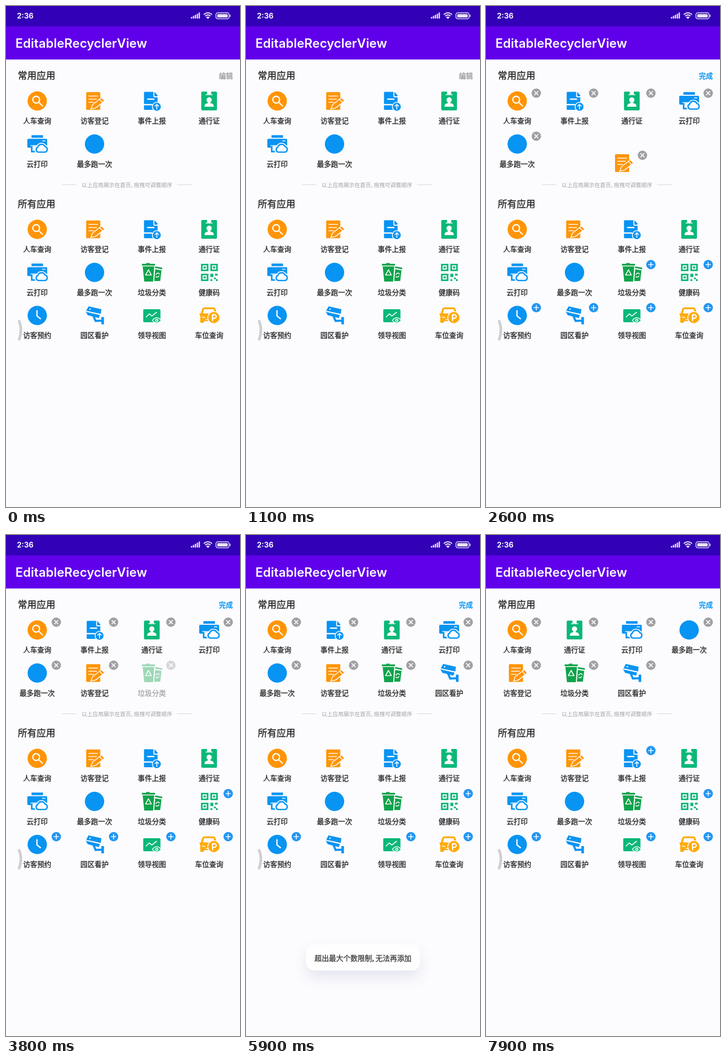
An HTML page for the animation above (8000 ms loop, 448x960 px).

```html
<!DOCTYPE html>
<html lang="zh-CN">
<head>
<meta charset="utf-8">
<title>EditableRecyclerView</title>
<style>
  :root {
    --paper: #fcfcff; --orange: #ff9505; --blue: #0894f2; --green: #0ab878;
    --leaf: #10a34c; --amber: #ffab08; --ink: #262626;
  }
  html, body { margin: 0; width: 100%; height: 100%; overflow: hidden; background: var(--paper); }
  svg { display: block; width: 448px; height: 960px; }
  text {
    font-family: "Noto Sans CJK SC", "Noto Sans CJK", "Noto Sans", sans-serif;
    font-weight: 500; fill: var(--ink); stroke: var(--ink); stroke-width: .35px;
  }
  .latin { font-family: Inter, Roboto, sans-serif; fill: #fcfcff; stroke: none; }
  .clock { font-size: 14px; font-weight: 700; }
  .bar { font-size: 24px; font-weight: 600; }
  .title { font-size: 18px; }
  .action { font-size: 13.5px; text-anchor: end; fill: #999; stroke: #999; }
  .action.done { fill: var(--blue); stroke: none; font-weight: 700; }
  .label { font-size: 13.5px; text-anchor: middle; }
  .hint { font-size: 10.5px; font-weight: 400; text-anchor: middle; fill: #a0a0a3; stroke: none; }
  .note { font-size: 13.75px; text-anchor: middle; fill: #0c0c0c; stroke: #0c0c0c; stroke-width: .45px; }
  .card { fill: #fff; filter: drop-shadow(0 13px 13px rgba(95, 95, 150, .2)); }
  .orange { fill: var(--orange); } .blue { fill: var(--blue); } .green { fill: var(--green); }
  .leaf { fill: var(--leaf); } .amber { fill: var(--amber); } .paper { fill: var(--paper); }
  .cut { fill: none; stroke: var(--paper); stroke-width: 2.4; stroke-linecap: round; stroke-linejoin: round; }
  .thin { stroke-width: 1.7; }
  .edge { stroke: var(--paper); stroke-width: 1.6; }
</style>
</head>
<body>
<svg viewBox="0 0 448 960">
  <defs>
    <clipPath id="listArea"><rect y="103" width="448" height="222"/></clipPath>

    <g id="search">
      <circle class="orange" r="18.5"/>
      <circle class="cut" cx="-2" cy="-2.5" r="6.5"/>
      <path class="cut" d="M3 2.5L10 9.5"/>
    </g>
    <g id="form">
      <rect class="orange" x="-16" y="-17" width="27" height="34" rx="1.5"/>
      <path class="cut thin" d="M-11 -9.5H6M-11 -3.5H4M-11 2.5H-2"/>
      <path class="orange edge" d="M-7 15.5L-4 7.5L13.5 -6.5L19.5 0L2 13.5Z"/>
      <path class="cut thin" d="M10.5 -2.5L15 2.5"/>
    </g>
    <g id="event">
      <path class="blue" d="M-15 -16Q-15 -17.5 -13.5 -17.5H3V-9Q3 -7 5 -7H11V17H-13.5Q-15 17 -15 15.5Z"/>
      <path class="blue" d="M5 -17.5L11 -11V-9H5Z"/>
      <path class="cut" d="M-8 -3.5H4M-15 7H-9M-8 7H0"/>
      <circle class="blue edge" cx="9.5" cy="11" r="8.5"/>
      <path class="cut thin" d="M9.5 15.5V7M6 10L9.5 6.5L13 10"/>
    </g>
    <g id="pass">
      <rect class="green" x="-15" y="-18" width="30" height="36" rx="2"/>
      <path class="paper" d="M-4 -18.5H4V-13H-4Z"/>
      <path class="cut thin" d="M-6 -12H6"/>
      <circle class="paper" cy="-2" r="5"/>
      <path class="paper" d="M-9 11Q-9 4.5 -3 4.5L-2 2H2L3 4.5Q9 4.5 9 11Z"/>
    </g>
    <g id="print">
      <rect class="blue" x="-11" y="-17" width="22" height="5"/>
      <rect class="blue" x="-19" y="-10" width="38" height="17" rx="2"/>
      <path class="blue" d="M-12 4H10V16H-12Z"/>
      <path class="cut thin" d="M-12 3H4M10 -6H15"/>
      <path class="paper" d="M-9 4H4V13H-9Z"/>
      <path id="cloud" d="M2 15.5A5 5 0 0 1 1 6A7.5 7.5 0 0 1 15 5A5.4 5.4 0 0 1 15 15.5Z" fill="var(--paper)" stroke="var(--paper)" stroke-width="6"/>
      <use href="#cloud" class="none"/>
      <path d="M2 15.5A5 5 0 0 1 1 6A7.5 7.5 0 0 1 15 5A5.4 5.4 0 0 1 15 15.5Z" fill="var(--paper)" stroke="var(--blue)" stroke-width="2.6"/>
    </g>
    <g id="run"><circle class="blue" r="18.5"/></g>
    <g id="bins">
      <path class="leaf" d="M-19 -16.5H-11V-18H-4V-16.5H6V-13H-19ZM-17.5 -11.5H4.5L2.5 17.5H-14.5Z"/>
      <path class="cut thin" d="M-6.5 -5L-1 5H-12Z"/>
      <path class="leaf" d="M6.5 -11.5L20 -9L19.5 -6L6 -8.5ZM6.5 -6L18.5 -4L16 16.5H4.5Z"/>
      <path class="cut thin" d="M8 4Q11 -1 14.5 3M13.5 7Q10.5 10.5 8 8"/>
    </g>
    <g id="code">
      <path d="M-14 -15H-3V-4H-14ZM4 -15H15V-4H4ZM-14 4H-3V15H-14Z" fill="none" stroke="var(--green)" stroke-width="3.2"/>
      <path class="green" d="M-10.5 -11.5H-6.5V-7.5H-10.5ZM7.5 -11.5H11.5V-7.5H7.5ZM-10.5 7.5H-6.5V11.5H-10.5ZM2.5 2.5H8V9H2.5ZM11 2.5H16.5V6H11ZM9 10H13V13H9ZM2.5 13H6V16.5H2.5ZM13 13H16.5V16.5H13Z"/>
    </g>
    <g id="clock">
      <circle class="blue" r="18.5"/>
      <path class="cut" d="M-.5 -9V1L6 6"/>
    </g>
    <g id="camera">
      <path class="blue" d="M-16 -9L-11.5 -17.5L13 -12L12 -3Z"/>
      <path class="blue" d="M-17 -7.5L10.5 -1L8 5L-13 -.5Z"/>
      <path class="cut thin" d="M-15 -7.5L11 -1.5"/>
      <path d="M-2 1L2 10.5L14 10" fill="none" stroke="var(--blue)" stroke-width="4"/>
      <path class="blue" d="M13 3H18V17H13Z"/>
      <circle class="paper" cx="-8.5" cy="-12" r="1.4"/>
    </g>
    <g id="chart">
      <rect class="green" x="-16.5" y="-12" width="33" height="25" rx="2"/>
      <path class="cut thin" d="M-11 3L-5 -3L0 1L9 -6"/>
      <path class="green edge" d="M1 9.5Q9.5 -1 18 9.5Q9.5 19 1 9.5Z"/>
      <circle class="paper" cx="9.5" cy="9.5" r="3"/>
      <circle class="green" cx="9.5" cy="9.5" r="1.3"/>
    </g>
    <g id="car">
      <path class="amber" d="M-19 -3L-16 -4L-13 -13Q-12 -15.5 -9 -15.5H8Q11 -15.5 12 -13L15 -4L18 -3V11H14V14H9V11H-10V14H-17V1Z"/>
      <path class="paper" d="M-12 -4L-9.5 -12H8.5L11 -4Z"/>
      <path class="cut thin" d="M-13 3L-8 4M-6 8H2"/>
      <circle class="amber edge" cx="9" cy="4" r="11.5"/>
      <path class="cut" d="M6.5 10V-1.5H10A3.5 3.5 0 0 1 10 5.5H6.5"/>
    </g>
    <g id="minus">
      <circle r="9" fill="#a0a0a2"/>
      <path class="cut thin" d="M-3.3 -3.3L3.3 3.3M3.3 -3.3L-3.3 3.3"/>
    </g>
    <g id="plus">
      <circle r="9" fill="#2196f3"/>
      <path class="cut thin" d="M-4.5 0H4.5M0 -4.5V4.5"/>
    </g>
  </defs>

  <rect class="paper" width="448" height="960"/>
  <rect y="39" width="448" height="63.5" fill="#6000ea"/>
  <rect width="448" height="39" fill="#3200b6"/>
  <text class="latin clock" x="21" y="23.5">2:36</text>
  <g fill="#e6e2f2">
    <path d="M354 21h2.5v3h-2.5zM357.7 19h2.5v5h-2.5zM361.4 17h2.5v7h-2.5zM365.1 15h2.5v9h-2.5zM368.8 12.5h2.5v11.5h-2.5z"/>
    <path d="M378.5 16.5Q386.5 9.5 394.5 16.5M381.3 19.3Q386.5 15 391.7 19.3" fill="none" stroke="#e6e2f2" stroke-width="2"/>
    <path d="M383 21.5Q386.5 18.8 390 21.5L386.5 25Z"/>
    <rect x="402" y="13" width="25" height="11.5" rx="3.5" fill="none" stroke="#e6e2f2" stroke-width="1.5"/>
    <rect x="404.5" y="15.5" width="20" height="6.5" rx="1.5"/>
    <path d="M428.5 16.5h1.5v4.5h-1.5z"/>
  </g>
  <text class="latin bar" x="18" y="80">EditableRecyclerView</text>

  <text class="title" x="22.5" y="140">常用应用</text>
  <text class="action" id="action" x="434.5" y="138.5">编辑</text>
  <path d="M107 342.5H135M327.5 342.5H356" stroke="#d6d6da"/>
  <text class="hint" x="231.5" y="347">以上应用展示在首页, 拖拽可调整顺序</text>
  <text class="title" x="22.5" y="386">所有应用</text>
  <g id="all"></g>
  <g id="common" clip-path="url(#listArea)"></g>
  <path d="M24.5 602Q32.5 621 24.5 640.5" fill="none" stroke="#d0d0d2" stroke-width="5"/>
  <g id="toast">
    <rect class="card" x="115" y="777" width="218" height="50" rx="15"/>
    <text class="note" x="224" y="808">超出最大个数限制, 无法再添加</text>
  </g>
</svg>

<script>
const LOOP = 8000, STEP = 100;
const EDIT = 1400, LIFT = 1800, SWAP = 2100, HOLD = 2500, DROP = 2800;
const ADD_BINS = 3752, ADD_CAMERA = 4460, REMOVE = 7400;
const TOAST_IN = 5700, TOAST_OUT = 7450;
const FADE = 120, MOVE = 250;
const CLOSE_UP = REMOVE + FADE;

const apps = {
  search: "人车查询", form: "访客登记", event: "事件上报", pass: "通行证",
  print: "云打印", run: "最多跑一次", bins: "垃圾分类", code: "健康码",
  clock: "访客预约", camera: "园区看护", chart: "领导视图", car: "车位查询"
};

// Slot history per app: [time, slot]
const tracks = {
  search: [[0, 0]],
  event: [[0, 2], [SWAP, 1]],
  pass: [[0, 3], [SWAP, 2], [CLOSE_UP, 1]],
  print: [[0, 4], [SWAP, 3], [CLOSE_UP, 2]],
  run: [[0, 5], [SWAP, 4], [CLOSE_UP, 3]],
  bins: [[0, 6], [CLOSE_UP, 5]],
  camera: [[0, 7], [CLOSE_UP, 6]],
  form: [[0, 1], [DROP, 5], [CLOSE_UP, 4]]
};
const addedAt = { bins: ADD_BINS, camera: ADD_CAMERA };

const $ = id => document.getElementById(id);
const ramp = (t, start, length) => Math.min(1, Math.max(0, (t - start) / length));
const ease = p => (1 - Math.cos(Math.PI * p)) / 2;
const mix = (a, b, p) => a.map((v, i) => v + (b[i] - v) * p);
const slot = (i, top = 182) => [59.8 + 109.7 * (i % 4), top + 82.5 * Math.floor(i / 4)];
const place = (el, [x, y]) => el.setAttribute("transform", `translate(${x} ${y})`);

function makeCell(parent, name, badge) {
  const cell = document.createElementNS("http://www.w3.org/2000/svg", "g");
  cell.innerHTML = `<use href="#${name}"/><text class="label" y="43">${apps[name]}</text>` +
    `<use class="badge" href="#${badge}" x="36.5" y="-15"/>`;
  parent.append(cell);
  return { name, cell, badge: cell.querySelector(".badge") };
}

const common = Object.keys(tracks).map(name => makeCell($("common"), name, "minus"));
const all = Object.keys(apps).map((name, i) => {
  const item = makeCell($("all"), name, "plus");
  place(item.cell, slot(i, 428));
  return item;
});

function dragPoint(t) {
  const p = ease(ramp(t, LIFT, HOLD - LIFT));
  const [from, bend, to] = [slot(1), [178, 292], [263, 301]];
  return mix(mix(from, bend, p), mix(bend, to, p), p);
}

function position(name, t) {
  if (name === "form" && t >= LIFT && t < DROP) return dragPoint(t);
  let at = slot(tracks[name][0][1]);
  for (const [time, index] of tracks[name].slice(1)) {
    if (t < time) break;
    if (name === "form" && time === DROP) at = dragPoint(DROP);
    at = mix(at, slot(index), ease(ramp(t, time, MOVE)));
  }
  return at;
}

function opacity(name, t) {
  if (name === "event") return 1 - ramp(t, REMOVE, FADE);
  return name in addedAt ? ramp(t, addedAt[name], FADE) : 1;
}

function isCommon(name, t) {
  if (name === "event") return t < REMOVE;
  return name in tracks && t >= (addedAt[name] || 0);
}

function draw(t) {
  const editing = t >= EDIT;
  const show = on => on ? "visible" : "hidden";
  $("action").textContent = editing ? "完成" : "编辑";
  $("action").classList.toggle("done", editing);
  for (const { name, cell, badge } of common) {
    place(cell, position(name, t));
    cell.setAttribute("opacity", opacity(name, t));
    badge.setAttribute("visibility", show(editing));
  }
  for (const { name, badge } of all)
    badge.setAttribute("visibility", show(editing && !isCommon(name, t)));
  const shown = ease(ramp(t, TOAST_IN, 300)) - ease(ramp(t, TOAST_OUT, 300));
  $("toast").setAttribute("opacity", shown);
  place($("toast"), [0, 30 * (1 - shown)]);
}

const start = performance.now();
function tick() {
  const t = (performance.now() - start) % LOOP;
  draw(Math.floor(t / STEP) * STEP);
  requestAnimationFrame(tick);
}
tick();
</script>
</body>
</html>
```
